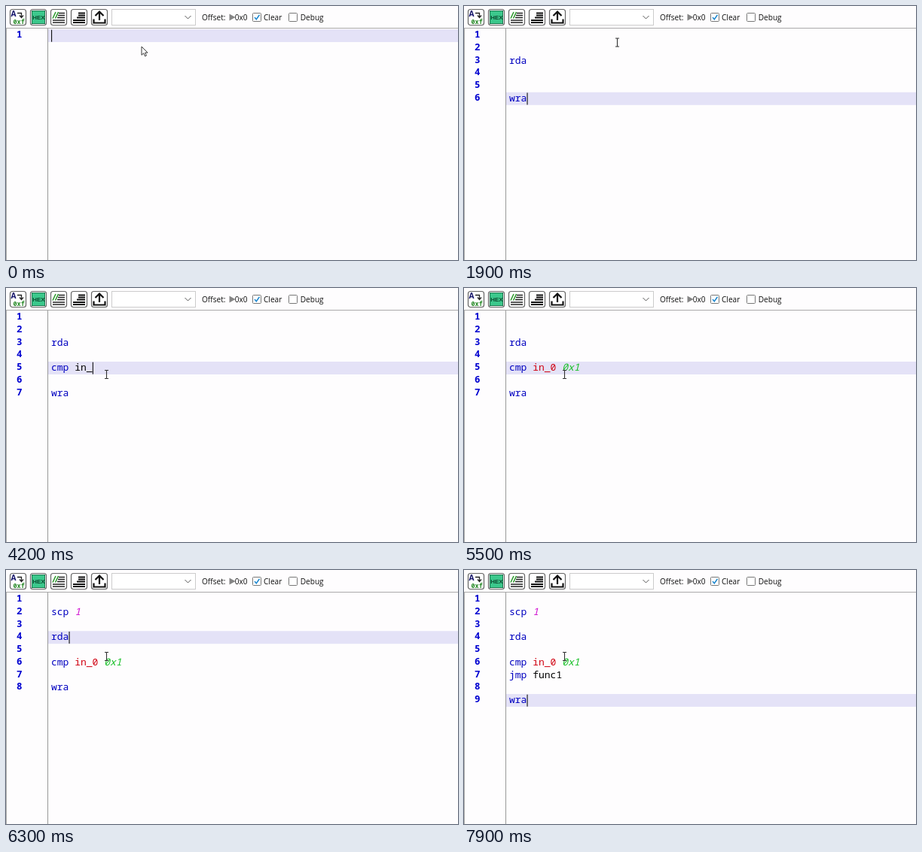
An HTML page that plays this animation: 600 px wide and 338 px high, repeating every 8000 ms.

```html
<!DOCTYPE html>
<html lang="en">
<head>
<meta charset="utf-8">
<title>Code editor</title>
<style>
  html, body { margin: 0; width: 100%; height: 100%; overflow: hidden; background: #fff; }
  svg { display: block; width: 600px; height: 338px; }
  text { white-space: pre; }
  .ui text { font: 10.1px "Open Sans", "Noto Sans", sans-serif; fill: #111; }
  .icon rect { fill: #fff; stroke: #666; stroke-width: 1.2; }
  #editor text { font: 500 13px "Noto Sans Mono", "DejaVu Sans Mono", monospace; }
  #editor .num { font-weight: 700; font-size: 12.5px; fill: #0000d0; }
  .keyword { fill: #0000c0; }
  .input { fill: #d00010; }
  .hex { fill: #18c028; font-style: italic; }
  .int { fill: #d010d0; font-style: italic; }
</style>
</head>
<body>
<svg viewBox="0 0 600 338">
  <rect width="600" height="338" fill="#fefdfe"/>
  <g class="ui">
    <g class="icon">
      <rect x="5.5" y="4.5" width="21" height="21" rx="3"/>
      <rect x="32.5" y="4.5" width="21" height="21" rx="3"/>
      <rect x="59.5" y="4.5" width="21" height="21" rx="3"/>
      <rect x="86.5" y="4.5" width="21" height="21" rx="3"/>
      <rect x="113.5" y="4.5" width="21" height="21" rx="3"/>
    </g>
    <text x="6.5" y="14" style="font-weight:700;fill:#10106a">A</text>
    <path d="M15 9.5H20.5V15M18 12.5L20.5 15.5L23 12.5" fill="none" stroke="#222" stroke-width="1.3"/>
    <text x="9.5" y="24" style="font:700 8.5px 'Noto Sans Mono',monospace;fill:#288a28">0xf</text>
    <rect x="34.5" y="6.5" width="17" height="17" fill="#3cc88c" stroke="#16754a"/>
    <text x="35.2" y="18.3" style="font:700 8px 'Liberation Sans',sans-serif;fill:#0b4a30">HEX</text>
    <path d="M70 9.5H78M69 12.5H78M68 15.5H78M62 19H78M62 22H78" stroke="#222" stroke-width="1.7"/>
    <path d="M62 16.5L66 8M65.5 16.5L69.5 8" stroke="#2f9a2f" stroke-width="1.6"/>
    <path d="M96 9.5H105M96 12.5H105M94 15.5H105M89 19H105M89 22H105" stroke="#111" stroke-width="1.9"/>
    <path d="M124 19V8M118.5 13L124 7.5L129.5 13M116.5 17.5V22.5H131.5V17.5" fill="none" stroke="#111" stroke-width="2.2"/>
    <rect x="140.5" y="4.5" width="111" height="21" fill="#fff" stroke="#ccc"/>
    <path d="M237.5 13L241.5 17L245.5 13" fill="none" stroke="#555"/>
    <text x="260" y="18.7">Offset:</text>
    <path d="M296.5 10.5L304.5 15L296.5 19.5Z" fill="#858585"/>
    <text x="303.7" y="18.7">0x0</text>
    <rect x="327.5" y="9.5" width="11" height="11" rx="1" fill="#fff" stroke="#777"/>
    <path d="M330 15L332.3 17.7L336.5 11.7" fill="none" stroke="#1c87cf" stroke-width="1.5"/>
    <text x="342" y="18.7">Clear</text>
    <rect x="375.5" y="9.5" width="11" height="11" rx="1" fill="#fff" stroke="#777"/>
    <text x="390.7" y="18.7">Debug</text>
  </g>
  <path d="M0 29.5H600M.5 29V338" stroke="#aaa"/>
  <g id="editor"></g>
  <path d="M55.5 30V338" stroke="#999"/>
  <path id="arrow" d="M0 0V11.3L2.7 8.8L4.5 12.8L6.4 12L4.6 8.1H8Z" fill="#fff" stroke="#222" stroke-width=".9"/>
  <path id="beam" d="M-2.5 -5.5H2.5M0 -5.5V5.5M-2.5 5.5H2.5" fill="none" stroke="#333" stroke-width="1.1"/>
</svg>
<script>
const LOOP = 8000, TOP = 31, LINE = 16.75, LEFT = 60, CHAR = 7.83, BLINK = 530;
const $ = id => document.getElementById(id);

// Bursts: start, ms per key, keys. ^ and v move the caret, @ clicks on line 5.
const keys = [
  [950, 90, "\n\nrda\n\n\nwra"],
  [2360, 170, "@\n^"],
  [3000, 160, "cmp "], [3850, 150, "in_0 "], [4650, 150, "0x1"],
  [5580, 55, "^^^\n^"], [5860, 60, "scp 1"], [6180, 70, "vv"],
  [6420, 70, "vvv\n^"], [6800, 80, "jmp "],
  [7220, 90, "func1"], [7700, 120, "vv"]
].flatMap(([start, step, text]) => [...text].map((key, i) => [start + i * step, key]));

// Pointer stops: time, x, y
const stops = [[100, 180, 54], [650, 203.5, 48.5], [2000, 203.5, 48.5], [2330, 139, 114],
  [2850, 139, 114], [3150, 133.5, 115]];

const kinds = [[/^(rda|wra|cmp|scp|jmp)$/, "keyword"], [/^in_\d+$/, "input"],
  [/^0x[\da-f]+$/, "hex"], [/^\d+$/, "int"]];

function edit(time) {
  const lines = [""];
  let row = 0, col = 0, wanted = 0, last = 0;
  for (const [at, key] of keys) {
    if (at > time) break;
    last = at;
    if ("^v@".includes(key)) {
      row = key === "@" ? 4 : row + (key === "v" ? 1 : -1);
      col = Math.min(wanted, lines[row].length);
      continue;
    }
    const before = lines[row].slice(0, col), after = lines[row].slice(col);
    if (key === "\n") {
      lines.splice(row++, 1, before, after);
      col = 0;
    } else {
      lines[row] = before + key + after;
      col++;
    }
    wanted = col;
  }
  return { lines, row, col, last };
}

const paint = line => line.replace(/\S+/g, word => {
  const kind = kinds.find(([pattern]) => pattern.test(word));
  return kind ? `<tspan class="${kind[1]}">${word}</tspan>` : word;
});

function pointer(time) {
  const next = stops.findIndex(stop => stop[0] > time);
  if (next === 0) return stops[0].slice(1);
  if (next < 0) return stops.at(-1).slice(1);
  const [t0, x0, y0] = stops[next - 1], [t1, x1, y1] = stops[next];
  const p = (time - t0) / (t1 - t0), ease = p * p * (3 - 2 * p);
  return [x0 + (x1 - x0) * ease, y0 + (y1 - y0) * ease];
}

function draw(now) {
  const time = now % LOOP;
  const { lines, row, col, last } = edit(time);
  const y = TOP + row * LINE;
  let out = `<rect x="56" y="${y}" width="544" height="17" fill="#e4e2f7"/>`;
  lines.forEach((line, i) => {
    const top = TOP + i * LINE;
    out += `<text class="num" x="14" y="${top + 11}">${i + 1}</text>` +
      `<text x="${LEFT}" y="${top + 12.2}">${paint(line)}</text>`;
  });
  if ((time - last) % (2 * BLINK) < BLINK)
    out += `<rect x="${LEFT + col * CHAR}" y="${y + .7}" width="1.1" height="16" fill="#111"/>`;
  $("editor").innerHTML = out;

  const [px, py] = pointer(time), isArrow = time < 200;
  for (const id of ["arrow", "beam"]) {
    $(id).setAttribute("transform", `translate(${px} ${py})`);
    $(id).style.display = (id === "arrow") === isArrow ? "" : "none";
  }
}

const begin = performance.now();
function tick() {
  draw(performance.now() - begin);
  requestAnimationFrame(tick);
}
tick();
</script>
</body>
</html>
```
